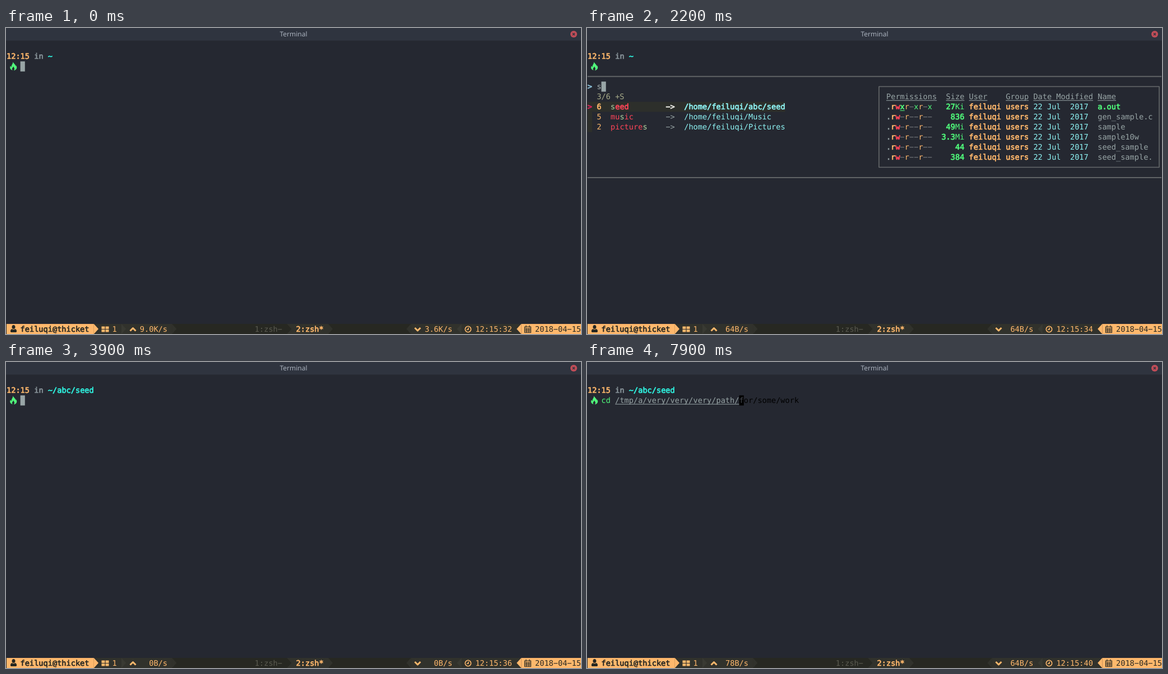
Animation of 1026 by 546 pixels, one loop 8 s. Source, as an HTML page with a canvas:

```html
<!DOCTYPE html>
<html lang="en">
<head>
<meta charset="utf-8">
<title>Terminal</title>
<style>
html, body { margin: 0; width: 100%; height: 100%; overflow: hidden; background: #252831; }
canvas { display: block; }
</style>
</head>
<body>
<canvas id="stage" width="1026" height="546"></canvas>
<script>
const ctx = document.getElementById('stage').getContext('2d');
const LOOP = 8000, CELL = 8.2, LINE = 18.02;
const C = {
  bg: '#252831', title: '#2f343f', orange: '#ffb86c', green: '#50fa7b', red: '#ff4558',
  cyan: '#8ff5f5', teal: '#2ff3e0', grey: '#98a5a6', dim: '#75797c', rule: '#66696b',
  select: '#2d2f2b', match: '#b4d6a4', bar: '#272822', seg: '#31322c', black: '#000'
};
const USER = 'feiluqi', HOST = 'thicket', HOME = '/home/' + USER;
const MARKS = {
  1: ['clojure', '/abc/clojure'], 2: ['pictures', '/Pictures'],
  3: ['id-matcher', '/develop/id-matcher'], 4: ['home', ''],
  5: ['music', '/Music'], 6: ['seed', '/abc/seed']
};
const DIRS = [['23 Jul', 'http'], ['26 Oct', 'my-stuff'], ['26 Oct', 'storm-starter']];
const FILES = [['27Ki', 'a.out'], ['836', 'gen_sample.c'], ['49Mi', 'sample'],
  ['3.3Mi', 'sample10w'], ['44', 'seed_sample'], ['384', 'seed_sample.']];
const COMMAND = 'cd /tmp/a/very/very/very/path/for/some/work';

// Each entry holds from its start time until the next one.
const NETWORK = [
  [0, '9.0K', '3.6K'], [900, '0B', '192B'], [1900, '64B', '64B'], [2900, '0B', '192B'],
  [3900, '0B', '0B'], [4900, '64B', '64B'], [5900, '162B', '312B'], [6900, '78B', '126B'],
  [7900, '78B', '64B']
];
const SEARCH = [[1700, '', '123456'], [2200, 's', '652'], [2500, 'se', '625'],
  [2700, 'see', '625'], [3100, 'seed', '6']];
const TYPED = [[3300, 0], [4500, 3], [4800, 4], [5700, 8], [6500, 15], [7000, 20],
  [7300, 25], [7700, 30]];

const at = (steps, t) => steps.filter(s => s[0] <= t).pop();
const px = col => 1 + col * CELL;
const py = row => 23.5 + row * LINE;

function block(col, row, width, color) {
  ctx.fillStyle = color;
  ctx.fillRect(px(col), py(row), width * CELL, LINE);
}

// Hyphens are drawn as wide dashes; bold is the regular face with a thin outline.
function put(col, row, text, color, bold = false, underline = false) {
  const x = px(col), y = py(row) + 13.5, shown = text.replaceAll('-', '\u2212');
  ctx.font = '13.62px "DejaVu Sans Mono", monospace';
  ctx.fillStyle = ctx.strokeStyle = color;
  ctx.fillText(shown, x, y);
  if (bold) {
    ctx.lineWidth = 0.7;
    ctx.strokeText(shown, x, y);
  }
  if (underline) ctx.fillRect(x, y + 1.7, text.length * CELL, 1);
}

function shape(path, color, x = 0, y = 0, lineWidth = 0) {
  ctx.save();
  ctx.translate(x, y);
  ctx.fillStyle = ctx.strokeStyle = color;
  ctx.lineWidth = lineWidth;
  if (lineWidth) ctx.stroke(new Path2D(path));
  else ctx.fill(new Path2D(path), 'evenodd');
  ctx.restore();
}

function titleBar() {
  ctx.fillStyle = C.title;
  ctx.fillRect(0, 0, 1026, 22);
  ctx.fillStyle = '#2a2e38';
  ctx.fillRect(0, 22, 1026, 1);
  ctx.font = '12px "Noto Sans", sans-serif';
  ctx.fillStyle = '#a9b1bd';
  ctx.textAlign = 'center';
  ctx.fillText('Terminal', 513, 15);
  ctx.textAlign = 'left';
  shape('M-6 0a6 6 0 1 0 12 0a6 6 0 1 0-12 0', '#c04d58', 1013, 11);
  shape('M-2-2L2 2M2-2L-2 2', C.title, 1013, 11, 1.5);
}

function prompt(dir) {
  put(0, 1, '12:15', C.orange, true);
  put(6, 1, 'in', '#89949a', true);
  put(9, 1, dir, C.teal, true);
  shape('M-1-8C1-5 4-3 5 0C5-1 5-2 4-3C7 0 7 4 4 6C3 7 2 7 1 7C3 5 2 3 0 0C0 2-3 3-2 6L-1 7' +
    'C-5 6-7 3-5-1C-4 0-4 1-3 1C-4-3 0-4-1-8Z', C.green, 13, 68.5);
}

function commandLine(count) {
  const split = 3 + count;
  put(3, 2, COMMAND.slice(0, Math.min(count, 2)), C.green);
  put(6, 2, COMMAND.slice(3, Math.max(count, 3)), C.grey, false, true);
  block(split, 2, 1, count ? C.black : C.grey);
  if (!count) return;
  put(split, 2, COMMAND[count], '#42464d');
  put(split + 1, 2, COMMAND.slice(count + 1), C.black);
}

function matchRow(id, row, query, selected) {
  const [name, path] = MARKS[id];
  const line = `${id}  ${name.padEnd(12)}->  ${HOME}${path}`;
  block(0, row, selected ? line.length + 2 : 1, C.select);
  if (selected) put(0, row, '>', '#e0245e', true);
  let found = 0;
  [...line].forEach((char, i) => {
    const hit = char === query[found];
    if (hit) found++;
    const color = i < 3 ? C.orange : i < 15 ? C.red : i < 19 ? (selected ? '#f2f2ec' : C.grey) : C.cyan;
    put(i + 2, row, char, hit ? C.match : color, selected && !hit);
  });
}

function permissions(row, mode, executable) {
  const tint = { d: C.cyan, r: C.orange, w: C.red, x: C.green, '.': C.grey, '-': C.dim };
  [...mode].forEach((char, i) =>
    put(65 + i, row, char, tint[char], i < 4 && char !== '-', executable && i === 3));
}

function preview(listing, isFiles) {
  const shift = isFiles ? 1 : 0;
  ctx.strokeStyle = C.rule;
  ctx.lineWidth = 1.6;
  ctx.strokeRect(521, 104.5, 500, 144);
  [[65, 'Permissions'], [77 + shift, 'Size'], [82 + shift, 'User'], [90 + shift, 'Group'],
    [96 + shift, 'Date Modified'], [110 + shift, 'Name']]
    .forEach(([col, label]) => put(col, 5, label, C.grey, false, true));
  listing.forEach(([info, name], i) => {
    const row = 6 + i, executable = isFiles && i === 0;
    permissions(row, executable ? '.rwxr-xr-x' : isFiles ? '.rw-r--r--' : 'drwxr-xr-x', executable);
    if (isFiles) {
      const amount = info.replace(/[A-Z]i/, ''), col = 82 - info.length;
      put(col, row, amount, C.green, true);
      put(col + amount.length, row, info.slice(amount.length), C.green);
    } else put(80, row, '-', C.dim);
    put(82 + shift, row, USER, C.orange, true);
    put(90 + shift, row, 'users', C.orange, true);
    put(96 + shift, row, (isFiles ? '22 Jul' : info) + '  2017', C.cyan);
    put(110 + shift, row, name, isFiles ? (executable ? C.green : C.grey) : C.cyan, executable || !isFiles);
  });
}

function finder(query, ids) {
  ctx.fillStyle = C.rule;
  ctx.fillRect(1, 85.6, 1024, 1.8);
  ctx.fillRect(1, 266, 1024, 1.8);
  put(0, 4, '>', '#8fc4dc', true);
  put(2, 4, query, '#a8b3b2');
  block(2 + query.length, 4, 1, C.grey);
  put(2, 5, `${ids.length}/6 +S`, '#a6aa88');
  [...ids].forEach((id, i) => matchRow(id, 6 + i, query, i === 0));
  preview(query ? FILES : DIRS, !!query);
}

function arrow(col, color, direction = 1) {
  const x = px(direction > 0 ? col : col + 1);
  shape(`M0 0L${direction * CELL} 9L0 18Z`, color, x, 528);
}

function statusBar(t) {
  const [, up, down] = at(NETWORK, t);
  const row = 28;
  ctx.fillStyle = C.bar;
  ctx.fillRect(1, 528, 1025, 18);
  block(19, row, 17, C.seg);
  block(61, row, 9, C.seg);
  block(88, row, 38, C.seg);
  block(0, row, 19, C.orange);
  block(112, row, 14, C.orange);
  arrow(19, C.orange);
  arrow(25, '#393a33');
  arrow(36, C.seg);
  arrow(61, C.bar);
  arrow(70, C.seg);
  arrow(87, C.seg, -1);
  arrow(98, '#393a33', -1);
  arrow(111, C.orange, -1);

  put(3, row, `${USER}@${HOST}`, C.bar, true);
  put(23, row, '1', C.orange);
  put(29, row, (up + '/s').padStart(6), C.orange);
  put(54, row, '1:zsh-', '#5a5a50');
  put(63, row, '2:zsh*', C.orange, true);
  put(91, row, (down + '/s').padStart(6), C.orange);
  put(102, row, '12:15:' + (32 + Math.floor((t + 100) / 1000)), C.orange);
  put(115, row, '2018-04-15', C.bar);

  shape('M-3-3.5a3 3.5 0 1 1 6 0a3 3.5 0 1 1-6 0M-3 0Q0 2 3 0Q6 1 5.5 5Q5 6 4 6H-4Q-5 6-5.5 5Q-6 1-3 0', C.bar, 13.5, 537);
  shape('M-6.5-5H-.6V-.6H-6.5ZM.6-5H6.5V-.6H.6ZM-6.5 .6H-.6V5H-6.5ZM.6 .6H6.5V5H.6Z', C.orange, 177, 537.5);
  shape('M-5 2.5L0-2.5L5 2.5', C.orange, 226.5, 538, 3);
  shape('M-5-2.5L0 2.5L5-2.5', C.orange, 734.5, 537.5, 3);
  shape('M-5.2 0a5.2 5.2 0 1 0 10.4 0a5.2 5.2 0 1 0-10.4 0M.5-3V.8H-2.5', C.orange, 824.5, 537.5, 1.6);
  shape('M-5.5-4.5H5.5V6H-5.5ZM-5.5-1.5H5.5M-5.5 1H5.5M-5.5 3.5H5.5M-2-1.5V6M2-1.5V6M-3-7V-3M3-7V-3', C.bar, 931, 537.5, 1.1);
}

function draw(t) {
  ctx.fillStyle = C.bg;
  ctx.fillRect(0, 0, 1026, 546);
  ctx.textRendering = 'geometricPrecision';
  ctx.lineJoin = 'round';
  titleBar();
  prompt(t < 3300 ? '~' : '~/abc/seed');
  if (t < 1700) commandLine(0);
  else if (t < 3300) finder(...at(SEARCH, t).slice(1));
  else commandLine(at(TYPED, t)[1]);
  statusBar(t);
}

function tick() {
  draw(performance.now() % LOOP);
  requestAnimationFrame(tick);
}
tick();
</script>
</body>
</html>
```
